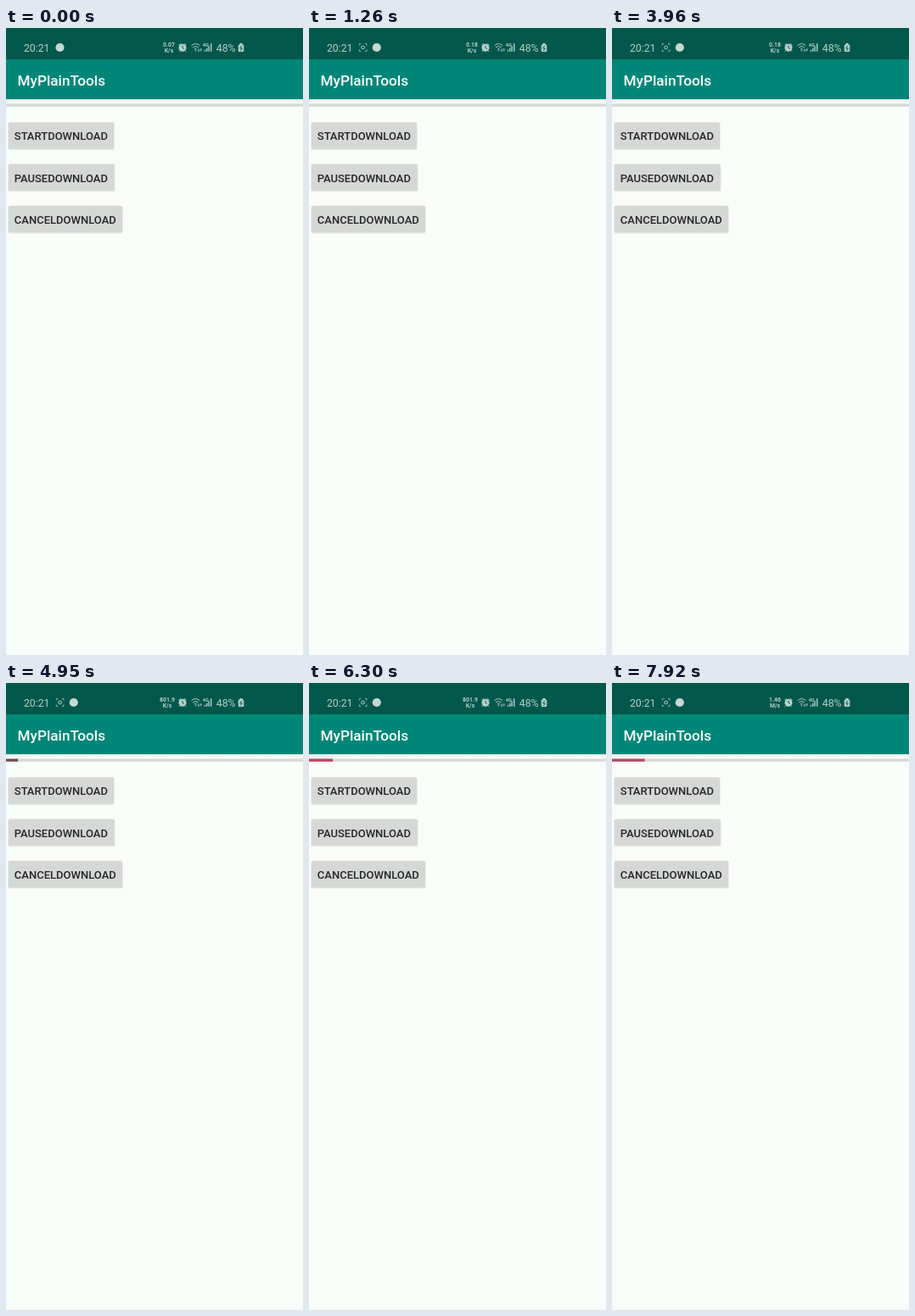
These frames come from a looping animation (350x740 px, 8000 ms). An HTML page:

```html
<!DOCTYPE html>
<html lang="en">
<head>
<meta charset="utf-8">
<title>Download screen</title>
<style>
  html, body { margin: 0; width: 100%; height: 100%; overflow: hidden; background: #fafcf9; }
  svg { display: block; width: 350px; height: 740px; font-family: Roboto, sans-serif; }
  .status { fill: #b5d1cb; font-size: 12.3px; }
  .speed { fill: #b5d1cb; font-size: 6.9px; font-weight: 700; text-anchor: middle; }
  .title { fill: #f8fcfa; font-size: 17.2px; font-weight: 500; }
  .label { fill: #252726; font-size: 13px; font-weight: 500; }
  .line { fill: none; stroke: #b5d1cb; stroke-width: 1; }
</style>
</head>
<body>
<svg viewBox="0 0 350 740">
  <defs>
    <linearGradient id="shade" x2="0" y2="1">
      <stop offset="0" stop-color="#dce4e0"/>
      <stop offset=".4" stop-color="#edf1ee"/>
      <stop offset="1" stop-color="#fafcf9"/>
    </linearGradient>
  </defs>
  <rect width="350" height="740" fill="#fafcf9"/>
  <rect width="350" height="37" fill="#00574a"/>
  <rect y="37" width="350" height="47" fill="#008677"/>
  <rect y="84" width="350" height="4" fill="url(#shade)"/>
  <text class="title" x="13.5" y="67.5">MyPlainTools</text>

  <text class="status" x="20.9" y="27.5">20:21</text>
  <g id="capture" class="line">
    <path d="M59.3 20.6v-2h2M66 18.6h2v2M68 25.4v2h-2M61.3 27.4h-2v-2" stroke-opacity=".75"/>
    <circle id="dot" cx="63.6" cy="23" r="1.9"/>
  </g>
  <circle id="notice" cy="23" r="5.1" fill="#c5d8d4"/>

  <text id="rate" class="speed" y="22"/>
  <text id="unit" class="speed" y="28.6"/>

  <g class="line">
    <circle cx="208" cy="23.2" r="4.5" fill="#b5d1cb" stroke="none"/>
    <path d="M203.5 20.3l2.2-2M212.5 20.3l-2.2-2M204.8 26.7l-1 1.2M211.2 26.7l1 1.2"/>
    <path d="M208 20.8v2.7l1.8 1" stroke="#00574a"/>
    <path d="M218.5 20.7q4.9-4.2 9.8 0M220.2 22.9q3.2-2.7 6.4 0M222 25q1.4-1.1 2.8 0"/>
    <circle cx="223.4" cy="26.6" r=".8" fill="#b5d1cb" stroke="none"/>
    <path d="M227 24.5v3M225.9 26.3l1.1 1.2 1.1-1.2M229.7 27.5v-3M228.6 25.7l1.1-1.2 1.1 1.2" stroke-width=".8"/>
    <path d="M234.5 27.8v-2M236.8 27.8v-4M239.1 27.8v-6.5M241.7 27.8v-9.5" stroke-width="1.4"/>
    <path d="M274.2 20.2h1.6v-1.7h2.4v1.7h1.6v7.3h-5.6z" fill="#b5d1cb"/>
    <path d="M277.7 21l-2 3h2.6l-2 2.8" stroke="#00574a"/>
  </g>
  <text class="speed" x="235.2" y="22" style="font-size:5.6px">4G</text>
  <text class="status" x="247.8" y="27.5">48%</text>

  <rect y="89.4" width="350" height="3.4" fill="#d7dad7"/>
  <rect id="bar" y="89.5" height="3.2"/>
  <g id="buttons"></g>
</svg>
<script>
const LOOP = 8000;
const $ = id => document.getElementById(id);

// Each entry: start time in ms, then the value held from there on.
const rates = [[0, '0.07', 'K/s'], [810, '0.18', 'K/s'], [4410, '801.9', 'K/s'],
               [6570, '1.60', 'M/s'], [7290, '1.46', 'M/s']];
const percents = [[0, 0], [4140, 1], [4410, 2], [4500, 3], [4950, 4], [5220, 5],
                  [5490, 6], [5760, 7], [6120, 8], [6480, 9], [6750, 10], [7470, 11]];
const tints = [[0, '#6b4c57'], [5220, '#a03b56'], [6120, '#bb3f60'], [7290, '#ad4862']];

const held = (steps, t) => steps.filter(([start]) => start <= t).pop();

function button(label, y, width) {
  return `<rect x="2.3" y="${y + .5}" width="${width + 1.2}" height="32.2" rx="2" fill="#e7eae7"/>
    <rect x="2.9" y="${y}" width="${width}" height="31.6" rx="1.6" fill="#d6d8d6"/>
    <text class="label" x="9.8" y="${y + 21.1}">${label}</text>`;
}

$('buttons').innerHTML = ['START', 'PAUSE', 'CANCEL'].map((verb, i) =>
  button(verb + 'DOWNLOAD', 111.2 + i * 49.3, [124.2, 125, 134.2][i])).join('');

function draw(t) {
  const slide = Math.min(4, Math.floor(t / 90)) / 4;
  $('notice').setAttribute('cx', 63.5 + 16.3 * slide);
  $('capture').setAttribute('opacity', slide);
  $('dot').setAttribute('opacity', t >= 5670 && t < 5850 ? 0 : 1);

  const [, rate, unit] = held(rates, t);
  const center = rate.length > 4 ? 190 : 192;
  for (const [id, text] of [['rate', rate], ['unit', unit]]) {
    $(id).textContent = text;
    $(id).setAttribute('x', center);
  }

  $('bar').setAttribute('width', held(percents, t)[1] * 3.5);
  $('bar').setAttribute('fill', held(tints, t)[1]);
}

const begin = performance.now();
function tick() {
  draw((performance.now() - begin) % LOOP);
  requestAnimationFrame(tick);
}
tick();
</script>
</body>
</html>
```
